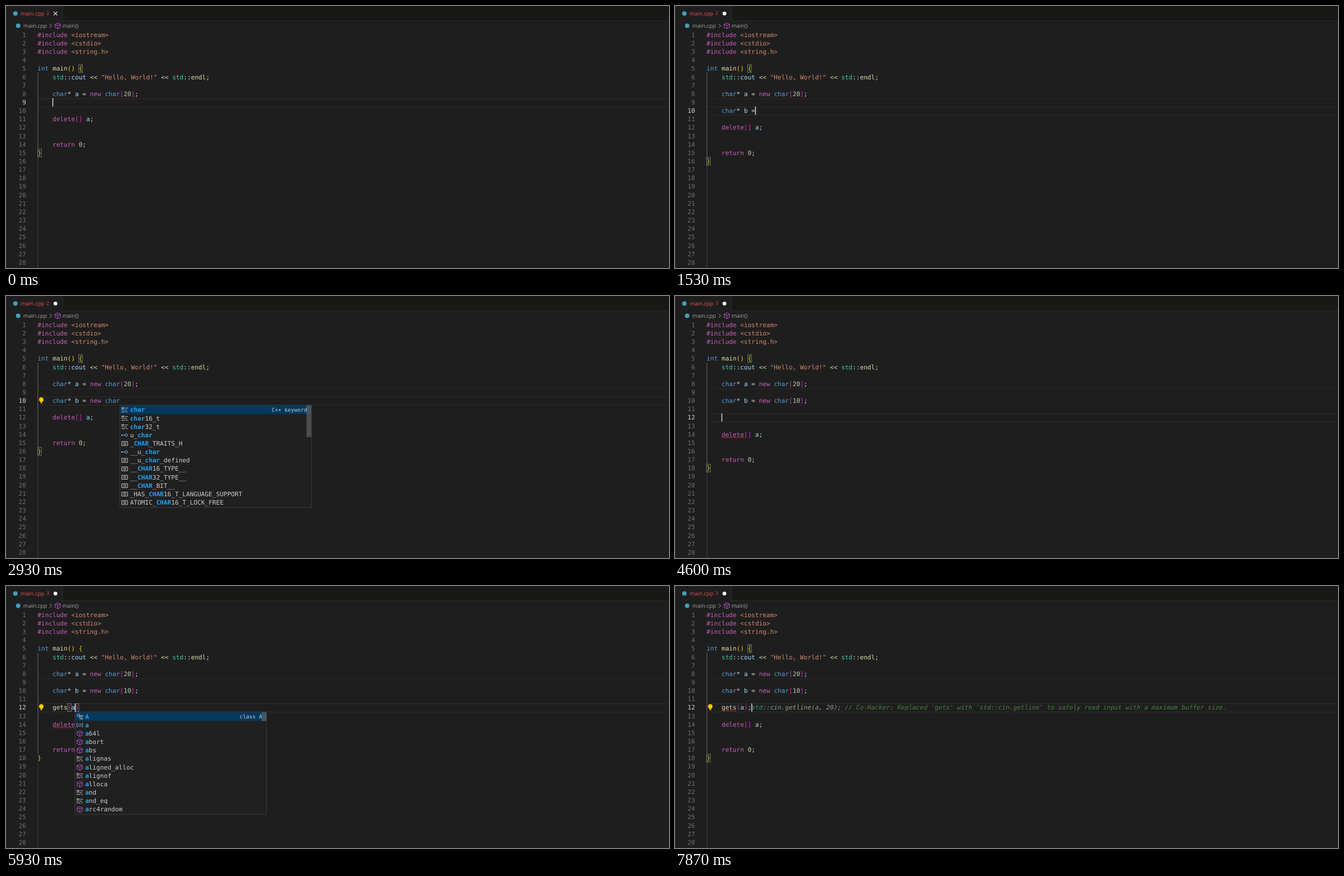
Write an HTML page that moves like this. It is 1189 px wide and 471 px high and loops after 8000 ms.

```html
<!DOCTYPE html>
<html lang="en">
<head>
<meta charset="utf-8">
<title>Code editor</title>
<style>
  html, body { margin: 0; width: 100%; height: 100%; overflow: hidden; background: #1f1e1e; }
  svg { display: block; width: 1189px; height: 471px; }
  text { font: 11.15px "DejaVu Sans Mono", monospace; text-rendering: geometricPrecision; white-space: pre; }
  .ui { font: 9.9px "Open Sans", "Noto Sans", sans-serif; }
  .detail { font-size: 9.55px; }
  .bold { font-weight: bold; }
  .ghost { font-style: italic; }
</style>
</head>
<body>
<svg id="stage" viewBox="0 0 1189 471"></svg>
<script>
const LOOP = 8000, CW = 6.71, LH = 15.15, X0 = 56.6, Y0 = 44.3, BASE = 11.45;
const stage = document.getElementById('stage');

// Keystrokes: time, characters
const KEYS = [
  [70, '\n    '], [270, 'c'], [330, 'h'], [470, 'a'], [530, 'r'],
  [870, '*'], [1000, ' '], [1130, 'b'], [1400, ' '], [1530, '='], [1670, ' '],
  [1730, 'n'], [1870, 'e'], [2000, 'w'], [2200, ' '], [2400, 'ch'], [2430, 'ar'],
  [3000, '['], [3200, '1'], [3400, '0'], [3670, ']'], [3830, ';'],
  [4470, '\n    '], [4530, '\n    '], [4670, 'g'], [4800, 'e'], [4930, 't'], [5070, 's'],
  [5330, '('], [5600, 'a'], [6130, ')'], [6570, ';']
];

const HEAD = ['#include <iostream>', '#include <cstdio>', '#include <string.h>', '', 'int main() {',
  '    std::cout << "Hello, World!" << std::endl;', '', '    char* a = new char[20];'];
const TAIL = ['', '    delete[] a;', '', '', '    return 0;', '}'];

const CHARS = 'k char|k char16_t|k char32_t|i u_char|c _CHAR_TRAITS_H|i __u_char|c __u_char_defined|' +
  'c __CHAR16_TYPE__|c __CHAR32_TYPE__|c __CHAR_BIT__|c _HAS_CHAR16_T_LANGUAGE_SUPPORT|c ATOMIC_CHAR16_T_LOCK_FREE';
const LISTS = [
  { from: 400, to: 870, items: CHARS, detail: 'C++ keyword', thumb: 57 },
  { from: 1200, to: 1400, detail: 'C++ keyword', thumb: 40,
    items: 'k bool|k break|k bitand|k bitor|f bcmp|f bcopy|f bsearch|f btowc|f bzero|i blkcnt_t|i blksize_t|c BUFSIZ' },
  { from: 1800, to: 2200, detail: 'C++ keyword', thumb: 40,
    items: 'k new|f newlocale|k namespace|k noexcept|k not|k not_eq|k nullptr|f nanosleep|f nice|f nrand48|i nlink_t|c NULL' },
  { from: 2530, to: 3000, items: CHARS, detail: 'C++ keyword', thumb: 57 },
  { from: 4730, to: 5330, detail: '', thumb: 40,
    items: 'f gets|f getsubopt|f getc|f getchar|f getdelim|f getenv|f getgid|f getline|f getopt|f getpid|f getuid|f getw' },
  { from: 5670, to: 6130, detail: 'class A', thumb: 16,
    items: 's A|v a|f a64l|f abort|f abs|k alignas|f aligned_alloc|k alignof|f alloca|k and|k and_eq|f arc4random' }
];

const CUBE = 'M8 1.5l6 3v7l-6 3-6-3v-7zM2 4.5l6 3 6-3M8 7.5v7';
const ICONS = {
  k: ['#c8c8c8', 'M1.5 3h5v2.5h-5zM9 4h6M1 8.5h4M7 8.5h6M1 12.5h8M11 12.5h4'],
  i: ['#75beff', 'M1 7h2v2h-2zM3 8h5.5M8.6 8a2.9 2.9 0 1 0 5.8 0a2.9 2.9 0 1 0-5.8 0'],
  c: ['#cccccc', 'M1.5 3.5h13v9h-13zM4.5 6.5h7M4.5 9.5h7'],
  f: ['#b856d0', CUBE],
  v: ['#75beff', 'M4 4h-2.5v8h2.5M12 4h2.5v8h-2.5M5.5 7l3-2 2.5 1.5v2.5l-3 2-2.5-1.5z'],
  s: ['#e4dccb', 'M1.5 5.5l4-4 3 3-4 4zM7 6.5h4M8.5 6.5v6h2.5M11 6.5l2-2 2 2-2 2zM11 12.5l2-2 2 2-2 2z']
};

// Syntax colours in order of precedence
const RULES = [
  [/^#include|^(new|delete|return)\b/, '#c85fb9'],
  [/^("[^"]*"|<[\w.]+>)/, '#ce8a70'],
  [/^(int|char)\b/, '#569cd6'],
  [/^std\b/, '#35cba8'],
  [/^(main|endl)\b|^gets(?=\()|^<</, '#dcdcaa'],
  [/^\d+/, '#b5cea8'],
  [/^[\[\]]/, '#d22cc4'],
  [/^[{}]/, '#e8cf2c'],
  [/^[a-z]\w*/i, '#9cdcfe'],
  [/^\s+/, ''],
  [/^./, '#d4d4d4']
];

const esc = s => s.replace(/&/g, '&amp;').replace(/</g, '&lt;');
const colX = c => X0 + c * CW;
const rowY = r => Y0 + (r - 1) * LH;
const text = (x, y, s, fill, cls = '', extra = '') =>
  `<text x="${x.toFixed(2)}" y="${y.toFixed(2)}" fill="${fill}" class="${cls}" ${extra}>${esc(s)}</text>`;
const rect = (x, y, w, h, fill, extra = '') =>
  `<rect x="${x}" y="${y}" width="${w}" height="${h}" fill="${fill}" ${extra}/>`;
const dot = (x, y, r, fill) => `<circle cx="${x}" cy="${y}" r="${r}" fill="${fill}"/>`;
const path = (d, stroke, w, extra = '') =>
  `<path d="${d}" fill="none" stroke="${stroke}" stroke-width="${w}" ${extra}/>`;
const icon = (x, y, [color, d]) =>
  path(d, color, 1.25, `transform="translate(${x - 6.4} ${y - 6.4}) scale(.797)"`);

function codeLine(line, row) {
  let out = '', col = 0;
  const paren = line[0] === ' ' ? '#d22cc4' : '#e8cf2c';
  while (col < line.length) {
    const rest = line.slice(col);
    const [re, color] = RULES.find(([r]) => r.test(rest));
    const tok = rest.match(re)[0];
    if (color) out += text(colX(col), rowY(row) + BASE, tok, /[()]/.test(tok) && tok.length === 1 ? paren : color);
    col += tok.length;
  }
  return out;
}

function header(t) {
  const dirty = t >= 70;
  return rect(0, 0, 1189, 26, '#181816') + rect(0, 0, 101, 27, '#1f1e1e') +
    rect(101, 0, 1, 26, '#2b2b2a') + rect(101, 26, 1088, 1, '#2b2b2a') + rect(0, 0, 1, 471, '#2a2a29') +
    dot(16.8, 13.4, 4, '#419fbe') +
    text(26.2, 16.8, 'main.cpp', '#e9534f', 'ui') +
    text(72.4, 16.4, t < 3930 ? '2' : '3', '#d84c48', 'ui', 'style="font-size:8.8px"') +
    (dirty ? dot(88.7, 13.6, 3.4, '#fff') : path('M85.4 10.3l6.6 6.6M92 10.3l-6.6 6.6', '#f0f0f0', 1.2)) +
    dot(21.8, 35.6, 4, '#419fbe') +
    text(31, 39, 'main.cpp', '#a2a2a2', 'ui') +
    path('M78.4 32l3.5 3.6l-3.5 3.6', '#a2a2a2', 1) +
    icon(92.9, 35.6, ICONS.f) +
    text(101.2, 39, 'main()', '#a2a2a2', 'ui');
}

function matchBox(row, col) {
  return rect(colX(col).toFixed(2), (rowY(row) + .5).toFixed(2), CW, LH - 1, 'rgba(0,100,0,.1)',
    'stroke="#888" stroke-width=".8"');
}

function squiggle(row, col, len) {
  const step = 2.4, x = colX(col), n = Math.round(len * CW / step);
  let d = '';
  for (let i = 0; i <= n; i++)
    d += `${i ? 'L' : 'M'}${(x + i * step).toFixed(1)} ${(rowY(row) + (i % 2 ? 12.3 : 14.2)).toFixed(1)}`;
  return path(d, '#e4304e', .9);
}

function bulb(row) {
  const y = rowY(row) + 5.5;
  return dot(63.3, y, 4, '#ffcc00') + rect(61.6, y + 2, 3.4, 3, '#ffcc00') + rect(61.6, y + 5.6, 3.4, 1.2, '#ffcc00');
}

function popup(list, word, row, col) {
  const x = colX(col) + .1, y = rowY(row + 1) + .3, w = 343.6;
  const items = list.items.split('|').filter(s => s.slice(2).toLowerCase().includes(word));
  const h = items.length * LH + 2.6;
  let out = rect(x, y, w, h, '#202020', 'rx="1.5" stroke="#454545" stroke-width=".8"') +
    rect(x + .6, y + .8, w - 1.2, LH, '#04395e');
  items.forEach((item, i) => {
    const name = item.slice(2), top = y + .8 + i * LH, tx = x + 18.1;
    const at = name.toLowerCase().indexOf(word), end = at + word.length;
    const put = (from, s, fill, cls) => s ? text(tx + from * CW, top + BASE, s, fill, cls) : '';
    out += icon(x + 8.5, top + LH / 2 + .2, ICONS[item[0]]) +
      put(0, name.slice(0, at), '#cccccc') +
      put(at, name.slice(at, end), '#22a2f2', 'bold') +
      put(end, name.slice(end), '#cccccc');
  });
  return out + text(x + 335.4, y + BASE + .4, list.detail, '#c4ccd2', 'detail', 'text-anchor="end"') +
    rect(x + w - 9, y + .6, 8.6, Math.min(list.thumb, h - 1), 'rgba(121,121,121,.5)');
}

function ghost(row, col) {
  const parts = [['std', '#34907c'], ['::cin.', '#7f9d94'], ['getline', '#9b9c7c'], ['(a, 20);', '#8e9a90'],
    [" // Co-Hacker: Replaced 'gets' with 'std::cin.getline' to safely read input with a maximum buffer size.", '#458042']];
  let out = '';
  for (const [s, color] of parts) {
    const pad = s.length - s.trimStart().length;
    out += text(colX(col + pad), rowY(row) + BASE, s.trim(), color, 'ghost');
    col += s.length;
  }
  return out;
}

function draw(t) {
  const pressed = KEYS.filter(k => k[0] <= t);
  const lastKey = pressed.length ? pressed[pressed.length - 1][0] : 0;
  const typed = ('    ' + pressed.map(k => k[1]).join('')).split('\n');
  const row = HEAD.length + typed.length;
  const before = typed[typed.length - 1], col = before.length;
  const open = before.match(/[\[(]\w*$/);
  const line = before + (open ? (open[0][0] === '[' ? ']' : ')') : '');
  const lines = [...HEAD, ...typed.slice(0, -1), line, ...TAIL];
  const last = lines.length;

  let out = header(t);
  out += rect(57, 166, 1132, 1, '#272726');
  for (const r of [row, row + 1])
    out += rect(57, Math.round(rowY(r) + .2), 1132, 1, '#2c2c2b');

  out += rect(56.7, rowY(6), 1, rowY(last) - rowY(6), '#6c6c6c') +
    rect(56.7, rowY(last + 1), 1, 471 - rowY(last + 1), '#424242');
  for (let r = 1; r <= 28; r++)
    out += text(36, rowY(r) + BASE, String(r), r === row ? '#d4d4d4' : '#6c7074', '', 'text-anchor="end"');

  if (open || /[\])]$/.test(before))
    out += matchBox(row, line.search(/[\[(]/)) + matchBox(row, line.search(/[\])]/));
  else
    out += matchBox(5, 11) + matchBox(last, 0);

  lines.forEach((s, i) => { out += codeLine(s, i + 1); });

  if (t >= 3930 && t < 6930) out += squiggle(last - 4, 4, 6);
  if (t >= 6930) out += squiggle(row, 4, 4);
  if ((t >= 2870 && t < 3670) || t >= 5800) out += bulb(row);
  if (t >= 7800) out += ghost(row, col);
  if ((t - lastKey) % 1000 < 500) out += rect((colX(col) - .2).toFixed(2), rowY(row) + .2, 1.5, LH - .4, '#d6d6d6');

  const list = LISTS.find(l => t >= l.from && t < l.to);
  if (list) out += popup(list, before.match(/\w*$/)[0], row, col);
  return out;
}

let shown = '';
const start = performance.now();
function tick() {
  const next = draw((performance.now() - start) % LOOP);
  if (next !== shown) stage.innerHTML = shown = next;
  requestAnimationFrame(tick);
}
tick();
</script>
</body>
</html>
```
